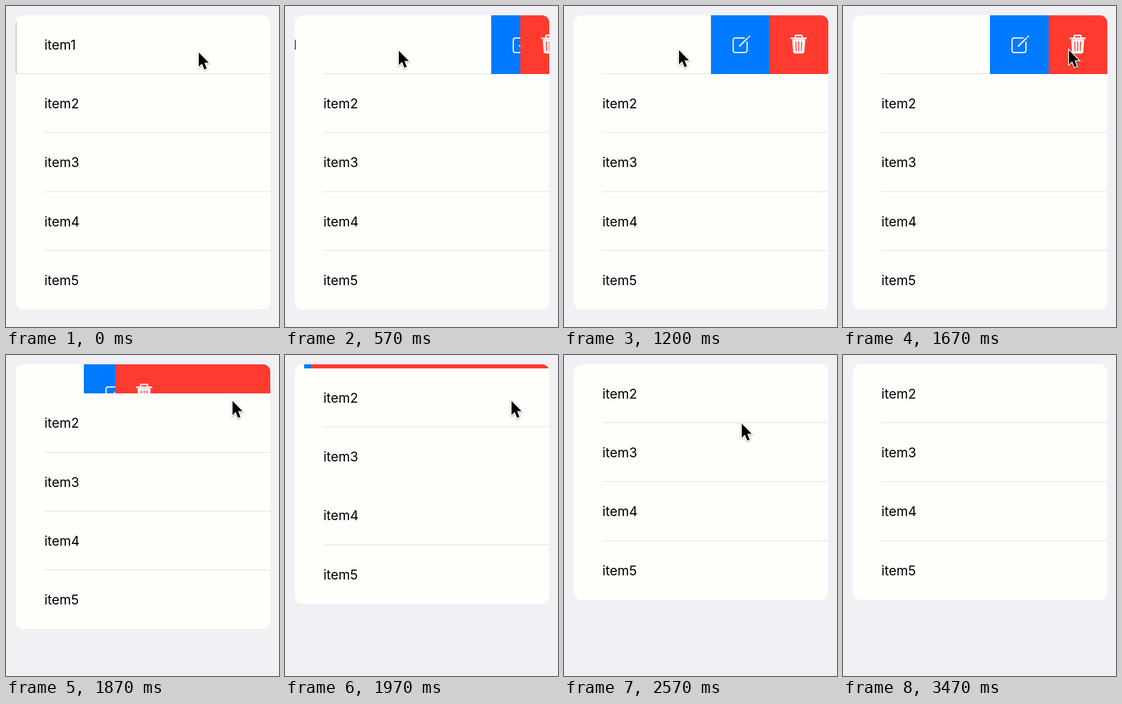
Recreate the animation shown at these times as an HTML page. Size 470 px wide and 552 px high, loop 3.63 s.

```html
<!DOCTYPE html>
<html lang="en">
<head>
<meta charset="utf-8">
<title>Swipe to delete</title>
<style>
  :root { --paper: #fefefb; --line: #e0e0d6; --blue: #007aff; --red: #ff3b30; }
  html, body { margin: 0; width: 100%; height: 100%; overflow: hidden; }
  body { position: relative; background: #f0f0f5; }
  div, svg { position: absolute; }
  #card { left: 17px; top: 16px; width: 438px; border-radius: 13px; overflow: hidden; background: var(--paper); }
  .row { position: relative; height: 101.2px; overflow: hidden; }
  .label { left: 49px; top: 37px; font: 22.8px/28px Inter, "Open Sans", sans-serif; color: #000; white-space: nowrap; }
  .rule { left: 49px; right: 0; top: 100.3px; height: 1px; background: var(--line); }
  .row:last-child .rule { display: none; }
  .action { left: 438px; top: 0; width: 438px; height: 102px; }
  #edit { background: var(--blue); }
  #trash { background: var(--red); }
  .action svg { left: 0; top: 0; }
  #edge { left: 0; top: 11px; width: 1px; height: 90px; background: #a8a8a4; }
  #edgeRule { left: 0; width: 49px; right: auto; }
  #cursor { left: 0; top: 0; overflow: visible; filter: drop-shadow(0 1px 1.5px rgba(0, 0, 0, .35)); }
</style>
</head>
<body>
<div id="card">
  <div class="row" id="swiped">
    <div class="rule"></div>
    <div class="rule" id="edgeRule"></div>
    <div id="edge"></div>
    <div class="label" id="first">item1</div>
    <div class="action" id="edit">
      <svg width="101" height="101" fill="none" stroke="#fff" stroke-width="2" stroke-linecap="round">
        <path d="M57 39H42Q38 39 38 43V60Q38 64 42 64H58Q62 64 62 60V46"/>
        <path d="M49 53L62.500 39.500M64.800 37.200L66 36" stroke-width="2.4"/>
      </svg>
    </div>
    <div class="action" id="trash">
      <svg width="101" height="101" fill="none" stroke="#fff" stroke-width="2.3" stroke-linecap="round" stroke-linejoin="round">
        <path d="M44 39V36.500Q44 34.500 46 34.500H54Q56 34.500 56 36.500V39M37 39.500H63"/>
        <path d="M40 42.500H60L58.500 62.500Q58.300 64.500 56 64.500H44Q41.700 64.500 41.500 62.500Z" fill="#fff"/>
        <path d="M45 45.500L45.600 61M50 45.500V61M55 45.500L54.400 61" stroke="#ff3b30" stroke-width="1.7"/>
      </svg>
    </div>
  </div>
</div>
<svg id="cursor" width="20" height="34">
  <path d="M0 0V24.200L5.500 19.100L9.500 29.100L13.600 27.400L9.600 17.600H17.200Z" fill="#000" stroke="#fff" stroke-width="3" paint-order="stroke"/>
</svg>
<script>
  const LOOP = 3630;
  const $ = id => document.getElementById(id);

  for (let i = 2; i <= 5; i++)
    $('card').insertAdjacentHTML('beforeend',
      `<div class="row"><div class="label">item${i}</div><div class="rule"></div></div>`);

  // Each step is [time in ms, value, easing towards the next step].
  function track(id, prop, steps, format) {
    const all = [[0, steps[0][1]], ...steps, [LOOP, steps[steps.length - 1][1]]];
    const frames = all.map(([t, value, easing = 'linear']) =>
      ({ offset: t / LOOP, [prop]: format(value), easing }));
    $(id).animate(frames, { duration: LOOP, iterations: Infinity });
  }

  const shift = v => `translateX(${-v}px)`;
  const drag = 'cubic-bezier(.35,.1,.5,1)';
  const spring = 'cubic-bezier(.3,.4,.7,.85)';
  const settle = 'cubic-bezier(.2,.6,.4,1)';
  const fall = 'cubic-bezier(.4,0,.7,.85)';

  const collapse = (from, near, end) => [[1720, from, fall], [1970, near, settle], [2130, end]];
  const swipe = (k, near) => [
    [30, 0, drag], [570, 100 * k], [600, 103 * k, spring], [870, 173 * k, settle], [1250, 202 * k],
    ...collapse(202 * k, near, 438)
  ];

  track('first', 'transform', swipe(1, 422), shift);
  track('edit', 'transform', swipe(1, 422), shift);
  track('trash', 'transform', swipe(.5, 409), shift);
  track('swiped', 'height', collapse(101.2, 7.2, 0), v => `${v}px`);

  for (const id of ['edge', 'edgeRule'])
    track(id, 'opacity', [[0, 1], [30, 1], [30, 0]], v => v);

  track('cursor', 'transform', [
    [0, [332, 80], drag], [570, [196, 77]], [700, [193, 76]],
    [1150, [193, 76], 'ease-in-out'], [1600, [389, 76]], [1670, [389, 76]],
    [1800, [390, 79]], [2200, [390, 79], 'ease-in-out'],
    [2570, [306, 118], 'ease-in'], [2740, [292, -40]]
  ], ([x, y]) => `translate(${x}px, ${y}px)`);
</script>
</body>
</html>
```
